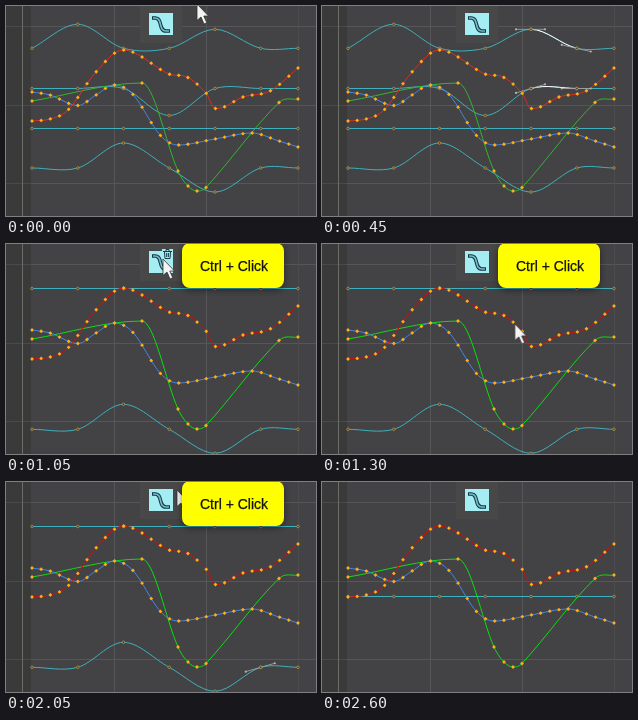
These frames come from a looping animation (310 by 210 pixels, 2850 ms). An HTML page:

```html
<!DOCTYPE html>
<html lang="en">
<head>
<meta charset="utf-8">
<title>Curve editor</title>
<style>
html, body { margin: 0; width: 100%; height: 100%; overflow: hidden; background: #434345; }
svg { display: block; width: 310px; height: 210px; }
path { fill: none; }
.grid { stroke: #565658; }
.axis { stroke: #6d6d68; }
.edge { stroke: #4c4c4e; }
.cyan { stroke: #3fb0bd; }
.blue { stroke: #4585e6; }
.key { fill: #ffae1a; }
.knot { fill: #4a4330; stroke: #b8934a; stroke-width: .8; }
.picked { stroke: #fff; }
.handle { stroke: #a0a0a0; stroke-width: .9; }
.grip { fill: #b4b4b4; }
.plate { fill: #a4edf3; }
.arrow { fill: #f4f4f4; stroke: #333; stroke-width: .8; }
.tip { fill: #ff0; filter: drop-shadow(0 2px 3px rgba(0,0,0,.45)); }
text { font: 14px "Liberation Sans", Arial, sans-serif; fill: #111; stroke: #111; stroke-width: .25; }

/* hard changes */
.cut, .red, .green { animation: 2850ms step-end infinite; }
.first { animation-name: first; }
.second { animation-name: second; }
.third { animation-name: third; }
.pick1 { animation-name: pick1; }
.pick2 { animation-name: pick2; }
.hover { animation-name: hover; }
.label { animation-name: label; }
.red { animation-name: red; }
.green { animation-name: green; }
#cursor { animation: shown 2850ms step-end infinite, move 2850ms linear infinite; }

@keyframes first { 0% { opacity: 1 } 36.8%, 100% { opacity: 0 } }
@keyframes second { 0% { opacity: 0 } 36.8% { opacity: 1 } 82.4%, 100% { opacity: 0 } }
@keyframes third { 0% { opacity: 0 } 82.4%, 100% { opacity: 1 } }
@keyframes pick1 { 0% { opacity: 0 } 15.7% { opacity: 1 } 36.8%, 100% { opacity: 0 } }
@keyframes pick2 { 0% { opacity: 0 } 61.3% { opacity: 1 } 82.4%, 100% { opacity: 0 } }
@keyframes hover {
  0% { opacity: 0 } 28% { opacity: 1 } 38.6% { opacity: 0 }
  73.6% { opacity: 1 } 84.2%, 100% { opacity: 0 }
}
@keyframes label { 0% { opacity: 0 } 31.5% { opacity: 1 } 91.1%, 100% { opacity: 0 } }
@keyframes red { 0% { stroke: #e32b1d } 36.8%, 100% { stroke: #d80b0b } }
@keyframes green { 0% { stroke: #35b432 } 36.8%, 100% { stroke: #0ddc12 } }
@keyframes shown {
  0% { opacity: 1 } 15.7% { opacity: 0 } 22.75% { opacity: 1 } 61.3% { opacity: 0 }
  71.85% { opacity: 1 } 87.6%, 100% { opacity: 0 }
}
@keyframes move {
  0%, 1.75% { transform: translate(191px, -2px) }
  14%, 15.8% { transform: translate(264px, 99px) }
  15.9%, 22.7% { transform: translate(137px, -14px) }
  28%, 28.5% { transform: translate(142px, 12px) }
  31.5%, 38% { transform: translate(157px, 15px); animation-timing-function: ease-in-out }
  54.3%, 56.1% { transform: translate(237px, 160px) }
  59.6%, 61.4% { transform: translate(268px, 188px) }
  61.5%, 72.8% { transform: translate(171px, 8px) }
  77.1%, 82.5% { transform: translate(157px, 15px) }
  87.6%, 100% { transform: translate(180px, 8px) }
}
</style>
</head>
<body>
<svg viewBox="0 0 310 210">
  <rect width="310" height="210" fill="#434345"/>
  <g id="grid"></g>
  <rect width="25" height="210" fill="#000" opacity=".14"/>
  <path class="axis" d="M16.5 0V210"/>
  <g id="first" class="cut first"></g>
  <g id="second" class="cut second"></g>
  <g id="third" class="cut third"></g>
  <g id="main"></g>
  <g id="pick1" class="cut pick1"></g>
  <g id="pick2" class="cut pick2"></g>

  <rect x="134" width="42" height="37" fill="#484849"/>
  <rect class="plate" x="143" y="7" width="24" height="22"/>
  <path d="M146 12H149C157 12 152 25 160 25H164" stroke="#17343e" stroke-width="3.6"/>
  <path d="M147 12H149C157 12 152 25 160 25H163" stroke="#76bcc6" stroke-width="1.6"/>
  <g class="cut hover">
    <rect class="plate" x="156" y="5" width="11" height="11"/>
    <path d="M157 7.5H166M160 7V5.5H163V7M158.5 8L159 14.5H164L164.5 8M160.7 9V13M162.4 9V13" stroke="#1c3b44"/>
  </g>

  <g id="cursor"><path class="arrow" d="M0 0V16.5L4 13L7 20L9.8 18.8L6.8 12H11.5Z"/></g>
  <g class="cut label">
    <rect class="tip" x="176" y="-1" width="102" height="45" rx="8"/>
    <text x="194" y="27">Ctrl + Click</text>
  </g>
</svg>
<script>
const NS = "http://www.w3.org/2000/svg";
const LEFT = 26, RIGHT = 292;

function add(id, tag, attrs) {
  const el = document.createElementNS(NS, tag);
  for (const k in attrs) el.setAttribute(k, attrs[k]);
  document.getElementById(id).append(el);
}

const line = (id, d, cls) => add(id, "path", { d, class: cls });
const dot = (id, [cx, cy], r, cls) => add(id, "circle", { cx, cy, r, class: cls });

// Auto tangent: flat at peaks, otherwise parallel to the neighbours
function slope(p, i) {
  const a = p[Math.max(i - 1, 0)], b = p[Math.min(i + 1, p.length - 1)], y = p[i][1];
  return (y - a[1]) * (b[1] - y) < 0 ? 0 : (b[1] - a[1]) / (b[0] - a[0]);
}

function spline(p, from = 0, to = p.length - 1) {
  let d = `M${p[from]}`;
  for (let i = from; i < to; i++) {
    const [x, y] = p[i], [u, v] = p[i + 1], h = (u - x) / 3;
    d += `C${x + h} ${y + h * slope(p, i)} ${u - h} ${v - h * slope(p, i + 1)} ${u} ${v}`;
  }
  return d;
}

// Height of the same spline at x
function heightAt(p, x) {
  const i = Math.max(0, p.findIndex(q => q[0] >= x) - 1);
  const [x0, y0] = p[i], [x1, y1] = p[i + 1], h = x1 - x0, t = (x - x0) / h, s = 1 - t;
  return y0 * s * s * (1 + 2 * t) + y1 * t * t * (3 - 2 * t)
    + h * t * s * (s * slope(p, i) - t * slope(p, i + 1));
}

// Seven knots at height y, some of them moved by bumps
const knots = (y, bumps = {}) => Array.from({ length: 7 }, (_, i) =>
  [Math.min(LEFT + 45.75 * i, RIGHT), y + (bumps[i] || 0)]);

function cyan(id, p) {
  line(id, spline(p), "cyan");
  p.forEach(q => dot(id, q, 1.3, "knot"));
}

function curve(p, cls, keys = p) {
  line("main", spline(p), cls);
  for (const [x, y] of keys) line("main", `M${x} ${y - 1.9}l1.9 1.9l-1.9 1.9l-1.9-1.9z`, "key");
}

function baked(p, cls) {
  const n = 29;
  curve(p, cls, Array.from({ length: n + 1 }, (_, i) => {
    const x = LEFT + (RIGHT - LEFT) * i / n;
    return [x, heightAt(p, x)];
  }));
}

function handle(id, p, i) {
  const m = slope(p, i);
  const [a, b] = [-15, 14].map(dx => [p[i][0] + dx, p[i][1] + dx * m]);
  line(id, `M${a}L${b}`, "handle");
  dot(id, a, 1.1, "grip");
  dot(id, b, 1.1, "grip");
  dot(id, p[i], 1.3, "knot");
}

for (let y = 20.5; y < 210; y += 78.5) line("grid", `M0 ${Math.floor(y) + .5}H310`, "grid");
for (let x = 108.5; x < RIGHT; x += 92) line("grid", `M${x} 0V210`, "grid");
line("grid", "M292.5 0V210", "edge");

const top1 = knots(42.3, { 1: -24, 4: -19 });
const dip = knots(82.5, { 3: 27 });
const wave = { 2: -25, 4: 24 };
const low = knots(185.3, wave);

[top1, dip, knots(122.5), knots(162, wave)].forEach(p => cyan("first", p));
[knots(44.5), low].forEach(p => cyan("second", p));
cyan("third", knots(114.5));

curve([[26, 95], [136, 77], [172, 165], [182, 180], [191, 185], [200, 181.5], [273, 96.5], [292, 93]], "green");
baked([[26, 86], [44, 89], [72, 99.5], [90, 89], [108, 79], [127, 88.5],
       [154, 129], [172, 139], [209, 133], [246, 127], [273, 135], [292, 141]], "blue");
baked([[26, 115], [44, 113], [62, 104], [90, 66], [117, 44], [163, 68], [181, 71],
       [200, 87], [209, 102.5], [218, 101], [237, 91], [264, 85], [292, 62]], "red");

for (const p of [top1, dip]) {
  line("pick1", spline(p, 4, 5), "picked");
  handle("pick1", p, 4);
  handle("pick1", p, 5);
}
handle("pick2", low, 5);
</script>
</body>
</html>
```
